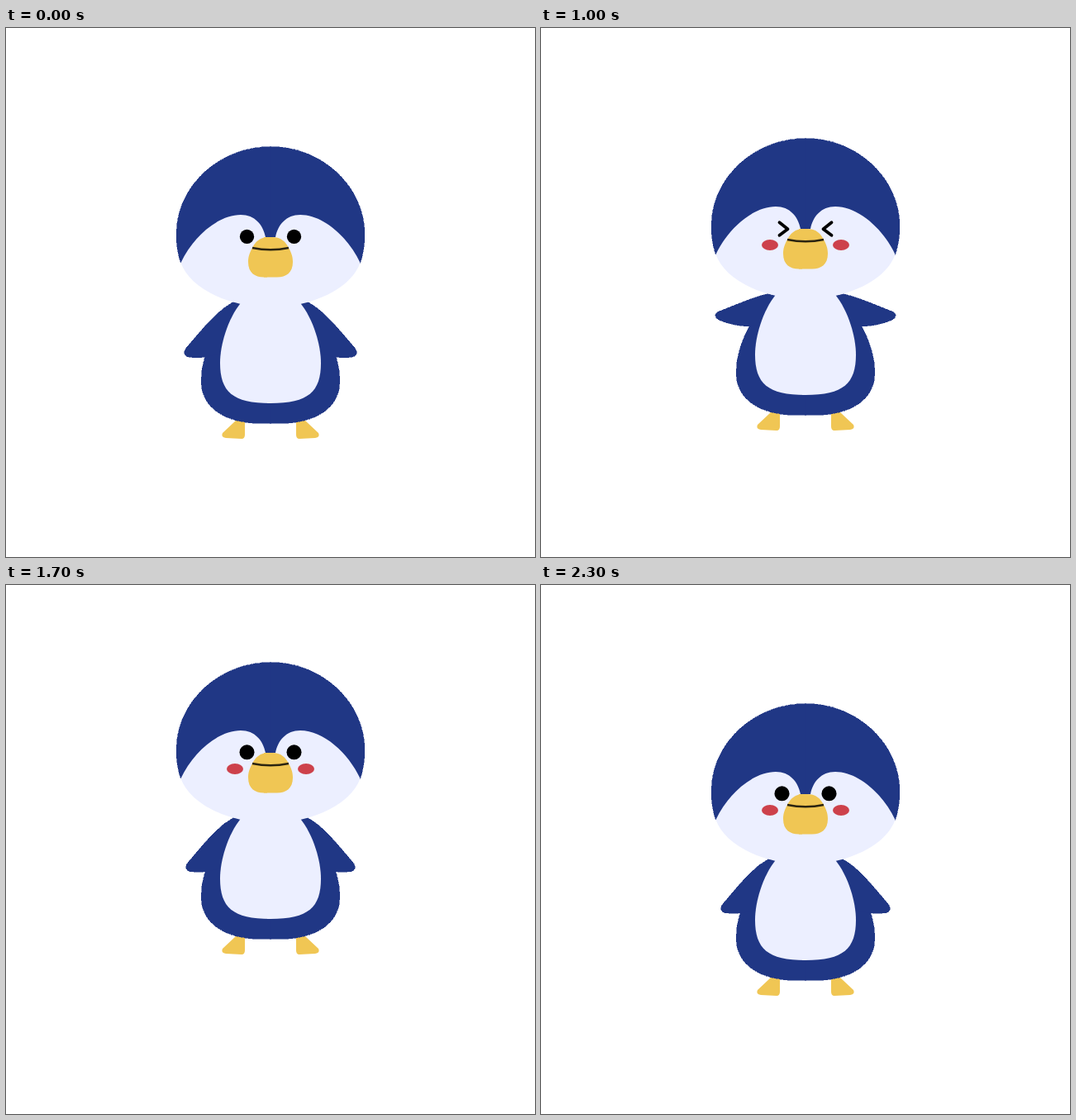
An HTML page that plays this animation: 640 px wide and 640 px high, repeating every 2.4 s.

```html
<!DOCTYPE html>
<html lang="en">
<head>
<meta charset="utf-8">
<title>Jumping penguin</title>
<style>
  html, body { margin: 0; width: 100%; height: 100%; overflow: hidden; background: #fff; }
  svg { display: block; width: 100%; height: 100%; }
  .blue { fill: #203785; stroke: #203785; stroke-width: .5; shape-rendering: crispEdges; }
  .pale { fill: #ecefff; }
  .gold { fill: #f0c654; }
  .red { fill: #cd414b; }
  .line { fill: none; stroke: #000; stroke-linecap: round; stroke-linejoin: round; }
</style>
</head>
<body>
<svg viewBox="0 0 640 640">
  <defs>
    <!-- Left half; upper layers reach further past the middle so that no seam shows -->
    <g id="half">
      <path class="gold" d="M279 474 L262 490 Q259.500 495 266 496 L285 497 Q289 497 289 492 V474 Z"/>
      <path class="blue" d="M280 333 C262 349 236 390 236 427 C236 460 265 478.500 310 478.500 L321 478 V333 Z"/>
      <g class="blue">
        <path class="armDown" d="M283 333 L275 331.500 C255 342 238 364 218 387 C213.500 393 216 397 221 398 Q230 399.500 243 398 L275 390 Z"/>
        <path class="armUp" d="M283 334 L275 331.500 C255 336 236 345 215 353 C209 356 210 360 215 363 C226 368 239 371 256 371 L275 370 Z"/>
      </g>
      <path class="pale" d="M324 332 H284.500 C268 352 259 384 259 405 C259 440 274 454 320 454 H324 Z"/>
      <path class="blue" d="M321 143.500 H320 C257 143.500 206 192 206 250 C206 262 208 275 211.500 284 L321 300 Z"/>
      <path class="pale" d="M211.500 284 C226 253 256 226 284 226 C301 226 311 238 314 253 H324 V334 H284 C244 325 219 305 211.500 284 Z"/>
      <path class="gold" d="M328 253 H319 C308 252.500 302 258 298 266 C294 273 293 278 293 283 C293 296 301 301.500 312 301.500 H328 Z"/>
      <ellipse class="red cheek" cx="277" cy="272.500" rx="10" ry="6.500"/>
      <circle class="eye" cx="291.500" cy="252.300" r="8.600"/>
      <path class="line squint" stroke-width="3.800" d="M288.500 245.300 L298.500 253.200 L288.500 260.800"/>
    </g>
  </defs>
  <g id="penguin">
    <use href="#half"/>
    <use href="#half" transform="translate(640 0) scale(-1 1)"/>
    <path class="line" stroke-width="2.400" style="stroke:#2b2410;stroke-linecap:butt" d="M298 266 Q320 270.500 342 266"/>
  </g>
</svg>
<script>
  const LOOP = 2400, STEP = 100, HEIGHT = 50;
  const penguin = document.getElementById('penguin');
  const half = document.getElementById('half');
  const part = name => half.querySelector('.' + name);
  const armDown = part('armDown'), armUp = part('armUp');
  const cheek = part('cheek'), eye = part('eye'), squint = part('squint');

  const ramp = (t, from, to) => Math.min(1, Math.max(0, (t - from) / (to - from)));
  const show = (el, on) => el.setAttribute('visibility', on ? 'visible' : 'hidden');

  function draw(t) {
    const happy = t >= 700;
    const raised = happy && t < 1400;
    const squinting = happy && t < 1700;
    const lift = HEIGHT * (ramp(t, 900, 1400) - ramp(t, 1700, 2300));

    penguin.setAttribute('transform', `translate(0 ${-Math.round(lift)})`);
    show(armUp, raised);
    show(armDown, !raised);
    armDown.setAttribute('transform',
      happy ? 'translate(283 333) scale(.97 .98) translate(-283 -333)' : '');
    show(cheek, happy);
    show(squint, squinting);
    show(eye, !squinting);
    eye.setAttribute('r', happy ? 9 : 8.6);
  }

  const start = performance.now();
  function tick() {
    const t = (performance.now() - start) % LOOP;
    draw(Math.floor(t / STEP) * STEP);
    requestAnimationFrame(tick);
  }
  draw(0);
  requestAnimationFrame(tick);
</script>
</body>
</html>
```
